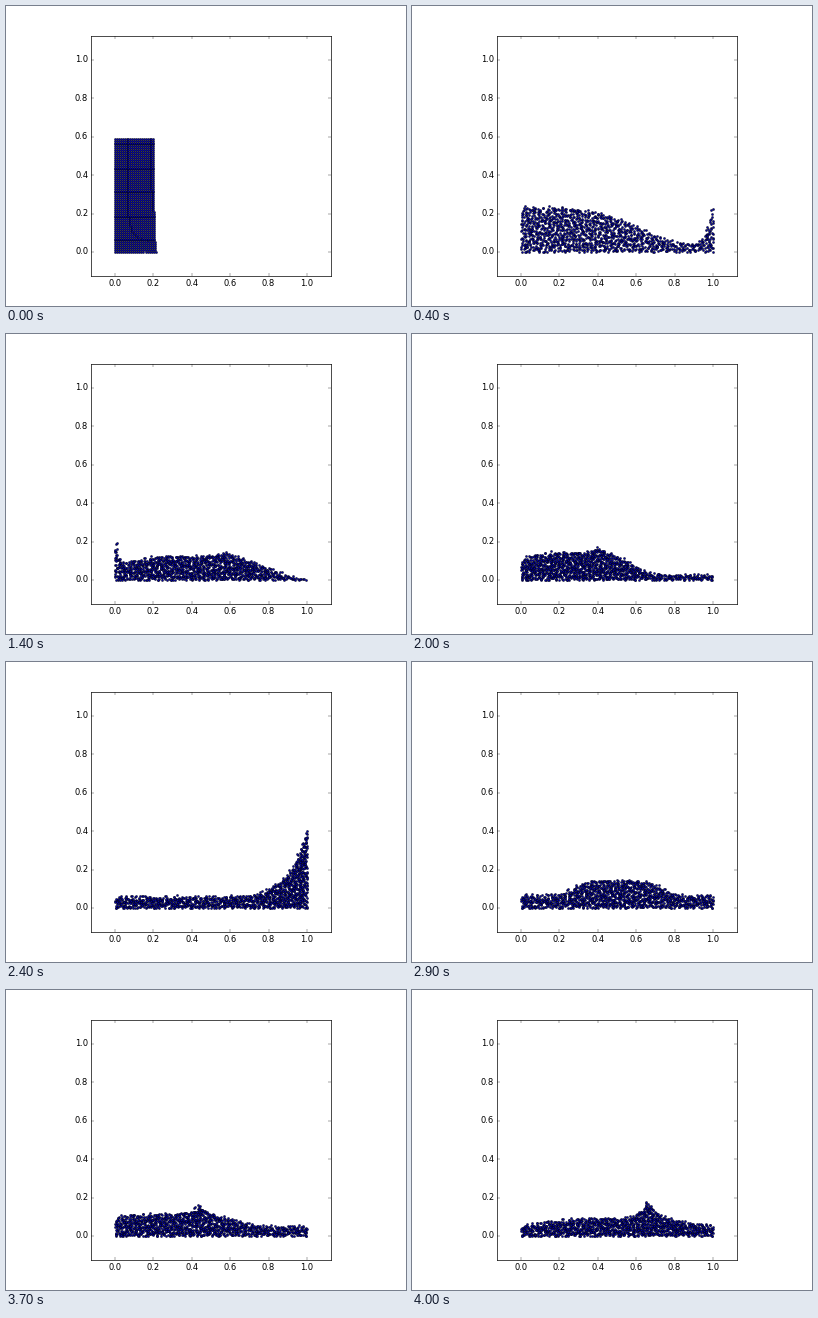
Animation of 400 by 300 pixels, one loop 4100 ms. Source, as a matplotlib script:

```python
import numpy as np
import matplotlib.pyplot as plt
from matplotlib.animation import FuncAnimation

FRAMES, STEP = 41, 100
GRAVITY, LAUNCH, LAND = 6.5, 0.42, 1.35

plt.rcParams.update({
    "font.family": "DejaVu Sans", "font.size": 12, "ytick.alignment": "center",
    "savefig.dpi": "figure", "savefig.facecolor": "auto",
})
rng = np.random.default_rng(7)

# Swell over time: time, centre, width, height, crest height, layer depth.
SWELL = np.array([
    (0.0, 0.0, 0.20, 0.590, 0, 0),
    (0.3, 0.0, 0.50, 0.290, 0, 0.015),
    (0.5, 0.0, 0.80, 0.100, 0, 0.06),
    (0.65, 1.0, 0.15, 0.080, 0, 0.07),
    (0.9, 1.0, 0.22, 0.240, 0, 0.034),
    (1.4, 0.4, 0.43, 0.120, 0.025, 0.005),
    (2.0, 0.27, 0.33, 0.115, 0.03, 0.028),
    (2.4, 0.95, 0.20, 0.020, 0, 0.058),
    (2.9, 0.5, 0.25, 0.080, 0, 0.065),
    (3.3, 0.0, 0.32, 0.090, 0, 0.052),
    (4.0, 0.5, 0.40, 0.040, 0.095, 0.052),
])
# Run-up at a wall: wall x, time, height, width, duration.
JETS = [(1, .65, .62, .03, .25), (0, 1.5, .23, .015, .18),
        (1, 2.5, .47, .08, .18), (0, 3.22, .23, .02, .18)]

# Starting block with a slight bulge at its foot.
gx, gy = np.meshgrid(np.linspace(0, .2, 21), np.linspace(0, .59, 60))
x0, y0 = gx.ravel(), gy.ravel()
block = np.array([x0 * (1 + .06 * np.exp(-y0 / .07)), y0])

# Each particle keeps its share of the volume to its left and its depth.
count = x0.size
rank = np.argsort(np.argsort(x0 - .35 * y0 + rng.normal(0, .02, count)))
share = (rank + .5) / count
depth = rank * .618034 % 1
noise = rng.normal(0, .005, (2, count))
grid = np.linspace(0, 1, 2001)


def surface(x, t):
    """Height of the water and the shape of the swell."""
    centre, width, height, crest, layer = (
        np.interp(t, SWELL[:, 0], col) for col in SWELL.T[1:])
    shape = np.exp(-((x - centre) / width) ** 4)
    peak = np.exp(-np.abs(x - centre - .4 * width) / .04)
    h = layer + height * shape + crest * peak
    for wall, when, rise, reach, length in JETS:
        pulse = np.exp(-((t - when) / length) ** 2)
        h = h + rise * pulse * np.exp(-np.abs(x - wall) / reach)
    return h, shape


def water(t):
    if t == 0:
        return block
    volume = np.cumsum(surface(grid, t)[0])
    x = np.interp(share, volume / volume[-1], grid)
    h, shape = surface(x, t)
    y = depth * h
    # The returning wave leans over its foot.
    lean = .2 * np.exp(-((t - .9) / .1) ** 2) * shape * (1 - shape)
    x = x - lean * np.clip((y - .05) / .03, 0, 1)
    return np.clip([x, y] + noise * np.minimum(1, h / .035), 0, 1)


# Clumps of spray thrown up the right wall, given by their height at 0.9 s.
flight = .9 - LAUNCH
height = np.repeat(np.linspace(.55, .97, 5), 8) + rng.normal(0, .016, 40)
speed = (height - .1 + GRAVITY / 2 * flight ** 2) / flight
drift = np.abs(rng.normal(0, .025, 40))


def spray(t):
    s = t - LAUNCH
    if not 0 < s < LAND - LAUNCH:
        return np.empty((2, 0))
    y = .1 + speed * s - GRAVITY / 2 * s ** 2
    return np.clip([1 - drift * s, y], 0, 1)


fig = plt.figure(figsize=(8, 6), dpi=50, facecolor="white")
ax = fig.add_axes([85 / 400, .1, .6, .8])
ax.set(xlim=(-.125, 1.125), ylim=(-.125, 1.125))
ticks = np.arange(6) * .2
labels = [f"{v:.1f}" for v in ticks]
ax.set_xticks(ticks, labels)
ax.set_yticks(ticks, labels)
ax.tick_params(direction="in", length=4, width=.5, pad=4, top=True, right=True)
for spine in ax.spines.values():
    spine.set_linewidth(1)
dots, = ax.plot([], [], ".", ms=6, mfc="#0000a0", mec="k", mew=.6)


def update(i):
    t = i * STEP / 1000
    dots.set_data(*np.hstack([water(t), spray(t)]))
    return dots,


anim = FuncAnimation(fig, update, frames=FRAMES, interval=STEP, repeat=True,
                     repeat_delay=0)
plt.show()
```
